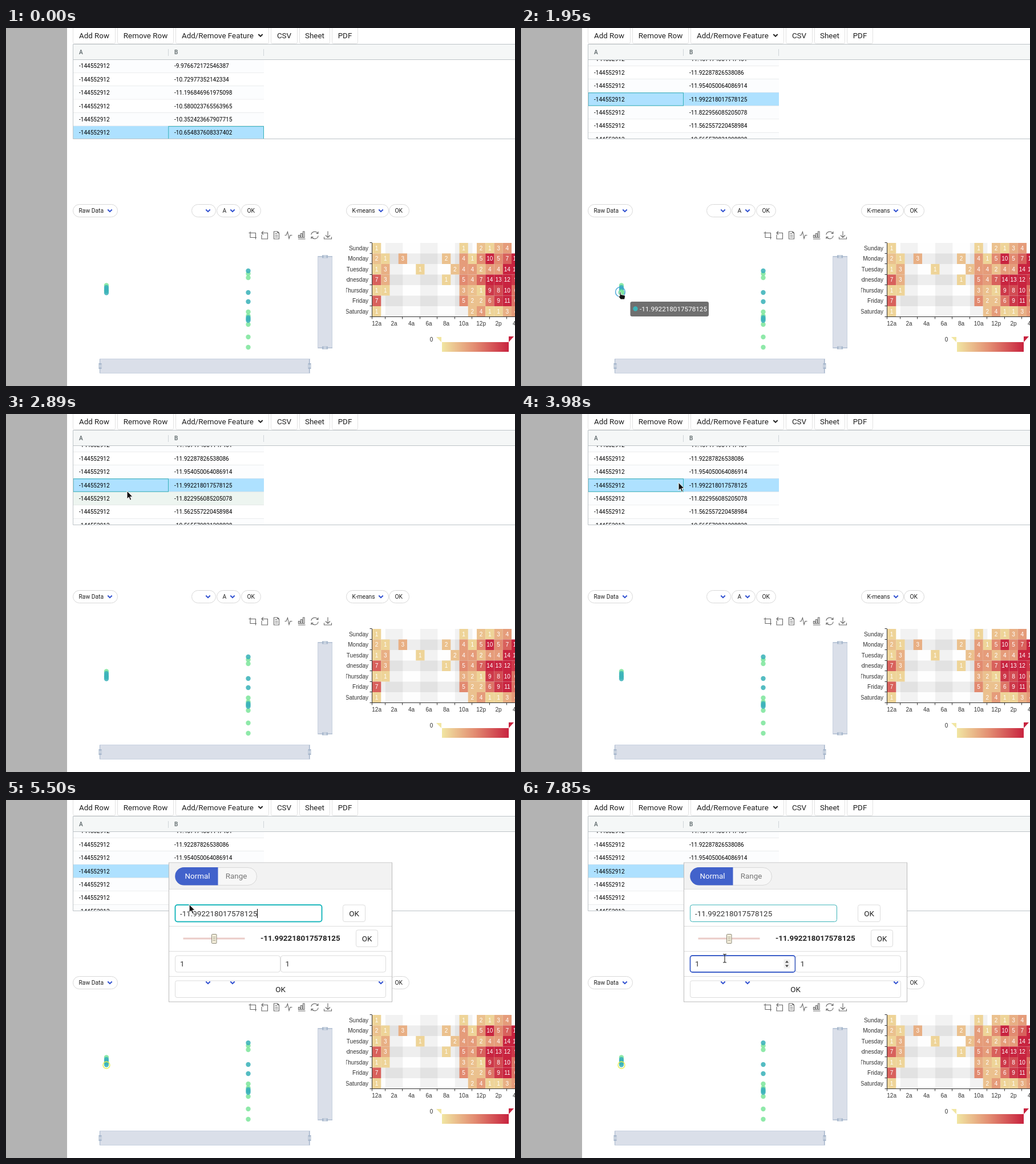
Animation of 892x628 px, one loop 8 s. Source, as an HTML page:

```html
<!DOCTYPE html>
<html lang="en">
<head>
<meta charset="utf-8">
<title>Data table and charts</title>
<style>
html, body { margin: 0; width: 100%; height: 100%; overflow: hidden; background: #fff; }
svg { display: block; width: 892px; height: 628px; font-family: Roboto, sans-serif; }
.chart { font-family: "Liberation Sans", Arial, sans-serif; }
</style>
</head>
<body>
<svg id="stage" viewBox="0 0 892 628"></svg>
<script>
const NS = 'http://www.w3.org/2000/svg';
const stage = document.getElementById('stage');
const LOOP = 8000;

function add(parent, tag, attrs = {}, content) {
  const node = document.createElementNS(NS, tag);
  set(node, attrs);
  if (content !== undefined) node.textContent = content;
  parent.appendChild(node);
  return node;
}
function set(node, attrs) {
  for (const key in attrs) node.setAttribute(key, attrs[key]);
}
const group = (parent, attrs) => add(parent, 'g', attrs);
const show = (node, on) => node.setAttribute('visibility', on ? 'visible' : 'hidden');
const rect = (parent, x, y, width, height, fill, more = {}) =>
  add(parent, 'rect', { x, y, width, height, fill, ...more });
const path = (parent, d, stroke, more = {}) =>
  add(parent, 'path', { d, stroke, fill: 'none', ...more });
const circle = (parent, cx, cy, r, more) => add(parent, 'circle', { cx, cy, r, ...more });

// Text placed by its vertical middle.
const label = (parent, x, mid, size, str, more = {}) =>
  add(parent, 'text', { x, y: mid + size * 0.355, 'font-size': size, fill: '#212121', ...more }, str);
const middle = { 'text-anchor': 'middle' };
const box = (parent, x1, y1, x2, y2, rx, stroke = '#dcdcdc', fill = '#fff') =>
  rect(parent, x1 + .5, y1 + .5, x2 - x1 - 1, y2 - y1 - 1, fill, { rx, stroke });
const chevron = (parent, x, y, stroke = '#2f4fd0') =>
  path(parent, `M${x - 3.7} ${y - 2}l3.7 3.7 3.7-3.7`, stroke, { 'stroke-width': 2 });

// ---- page and toolbar ----
rect(stage, 0, 0, 892, 628, '#fff');
rect(stage, 0, 0, 107, 628, '#b3b3b3');

[[117, 192, 'Add Row'], [195, 294, 'Remove Row'], [297, 461, 'Add/Remove Feature'],
 [464, 511, 'CSV'], [514, 568, 'Sheet'], [571, 617, 'PDF']].forEach(([x1, x2, name]) => {
  box(stage, x1, -4, x2, 28, 3, '#e2e2e2');
  if (name.includes('/')) {
    label(stage, 308, 13, 13.4, name);
    chevron(stage, 446, 13, '#212121');
  } else label(stage, (x1 + x2) / 2, 13, 13.4, name, middle);
});

// ---- table ----
const ROW = 23.4;
const TEAL = '#35b0b8';
const defs = add(stage, 'defs');
function clip(id, x, y, w, h) {
  rect(add(defs, 'clipPath', { id }), x, y, w, h, '#000');
  return `url(#${id})`;
}
const table = group(stage, { 'clip-path': clip('rows', 117, 56, 336, 138.5) });

function buildRows(top, values, selected, parent) {
  return values.map((value, i) => {
    const y = top + i * ROW;
    const base = i === selected ? '#aee1ff' : i % 2 ? '#fff' : '#fcfdfe';
    const back = rect(parent, 118, y, 334, ROW, base);
    path(parent, `M118 ${y + ROW}H452`, '#d9dcde');
    label(parent, 128, y + ROW / 2, 10.05, '-144552912', { fill: '#000' });
    label(parent, 295, y + ROW / 2, 10.05, value, { fill: '#000' });
    return { back, base, y };
  });
}
const before = group(table), after = group(table);
buildRows(55.1, ['-9.976672172546387', '-10.72977352142334', '-11.196846961975098',
  '-10.580023765563965', '-10.352423667907715', '-10.654837608337402'], 5, before);
rect(before, 284.8, 172.6, 166.7, 21.9, 'none', { stroke: TEAL });
const rows = buildRows(43.1, ['-11.457174301147461', '-11.92287826538086', '-11.954050064086914',
  '-11.992218017578125', '-11.822956085205078', '-11.562557220458984', '-10.565579831298828'], 3, after);
const focusCell = rect(after, 118, 113.8, 166.5, 22.4, 'none', { stroke: TEAL });

rect(stage, 117, 28.5, 776, 27, '#f5f7f7');
path(stage, 'M892 28.5H117.5V194.5H892M117 55.5H892', '#bdc3c7');
path(stage, 'M284.5 37V49M451.5 37V49', '#cfd4d8');
['A', 'B'].forEach((name, i) =>
  label(stage, 128 + 167 * i, 42.5, 10.05, name, { fill: '#6d7779', 'font-weight': 700 }));

// ---- select buttons ----
const selects = [[117, 196, 'Raw Data', 182], [325, 368, '', 354], [369, 411, 'A', 397],
  [412, 447, 'OK'], [596, 671, 'K-means', 657], [671, 707, 'OK']];
selects.forEach(([x1, x2, name, arrow]) => {
  box(stage, x1, 309, x2, 332, 11, '#d8d8d8');
  label(stage, x1 + 10.5, 320.5, 10.3, name);
  if (arrow) chevron(stage, arrow, 320.5);
});

// ---- chart tool icons ----
[[432, 'M-6.5-4H5.5V7M-4-6.5V4H3M3 4H7'],
 [453, 'M-5-4H5.5V6.5H-5V-1M-2-7-5-4-2-1'],
 [474, 'M-4.5-6.5H2L4.5-4V6.5H-4.5ZM2-6.5V-4H4.5M-2.5-3H1M-2.5 0H2.5M-2.5 3H2.5'],
 [495, 'M-6.5 0H-4L-1.5-6 1 6 3 0H6.5'],
 [518, 'M-6 6.5H6.5M-5.5 4V0H-3V4ZM-1.5 4V-3H1V4ZM2.5 4V-6.5H5V4Z'],
 [541, 'M-6.2-1A6.3 6.3 0 0 1 5.5-3M6.2 1A6.3 6.3 0 0 1-5.5 3M6-6.5V-3H2.5M-6 6.5V3H-2.5'],
 [564, 'M0-7V4M-4 0 0 4 4 0M-6.5 3V6.5H6.5V3']].forEach(([x, d]) =>
  path(stage, d, '#666', { transform: `translate(${x} 363.5)`, 'stroke-width': 1.1 }));

// ---- scatter ----
const GREEN = '#80e69d', DOT = '#3cb3b9';
const dots = (x, ys, fill) => ys.forEach(y => circle(stage, x, y, 4.2, { fill, 'fill-opacity': .88 }));
dots(176, [451.5, 461], GREEN);
dots(176, [455, 458, 461, 464.5], DOT);
dots(424.5, [431, 438, 498, 505, 520, 542, 560], GREEN);
dots(424.5, [426, 464, 480, 508, 510.5, 513], DOT);
const hoverDot = circle(stage, 176, 464, 5, { fill: GREEN, stroke: '#6dd6b0' });
const yellowRing = circle(stage, 176, 465, 6, { fill: 'none', stroke: '#e8ee4e', 'stroke-width': 1.3 });

function handle(x, y, turn) {
  const g = group(stage, { transform: `translate(${x} ${y}) rotate(${turn})` });
  rect(g, -2.5, -5, 5, 10, '#a7b7cc');
  path(g, 'M-1-2.5V2.5M1.2-2.5V2.5', '#fff', { 'stroke-width': .8 });
}
box(stage, 164, 580, 533, 606, 0, '#c9d2e0', '#dadfe9');
box(stage, 546, 400, 572, 562, 0, '#c9d2e0', '#dadfe9');
path(stage, 'M164.5 581V605M531.5 581V605M547 401H572M547 561H572', '#a7b7cc');
handle(165, 593, 0);
handle(532, 593, 0);
handle(559, 401, 90);
handle(559, 561, 90);

// ---- heat map ----
const heat = group(stage, { class: 'chart', 'clip-path': clip('heat', 596, 340, 296, 288) });
const X0 = 642, Y0 = 377, CW = 15.25, CH = 18.5;
const ramp = [[241, 230, 162], [226, 138, 112], [200, 35, 63]];
function heatColor(value) {
  const p = Math.min(value, 10) / 5, i = Math.min(Math.floor(p), 1);
  return `rgb(${ramp[i].map((c, k) => Math.round(c + (ramp[i + 1][k] - c) * (p - i)))})`;
}
const shade = i => i % 2 ? 'rgba(200,200,200,.3)' : 'rgba(250,250,250,.3)';
for (let i = 0; i < 9; i++) {
  const start = Math.max(X0, X0 + CW * (2 * i - .5));
  rect(heat, start, Y0, X0 + CW * (2 * i + 1.5) - start, CH * 7, shade(i));
}
const week = { Sunday: '1.........1.2134.', Monday: '21.3....2.415a57b', Tuesday: '13...1...244244ec',
  Wednesday: '73......1.547edc9', Thursday: '11........32198a6', Friday: '7.........52269b6',
  Saturday: '1..........241134' };
Object.entries(week).forEach(([day, counts], r) => {
  const y = Y0 + r * CH, mid = y + CH / 2;
  rect(heat, X0, y, 260, CH, shade(r));
  label(heat, 635, mid, 10.05, day, { 'text-anchor': 'end', fill: '#333' });
  [...counts].forEach((c, h) => {
    if (c === '.') return;
    const value = parseInt(c, 16), x = X0 + h * CW;
    rect(heat, x, y, CW, CH, heatColor(value));
    label(heat, x + CW / 2, mid, 10.05, value, { ...middle, fill: '#fff' });
  });
});
let axis = 'M641.5 377V507M641.5 506.5H892';
for (let r = 0; r < 8; r++) axis += `M637.5 ${Math.round(Y0 + r * CH) - .5}h4`;
for (let i = 0; i < 9; i++) {
  const x = Math.max(641.5, Math.round(X0 + CW * (2 * i - .5)) - .5);
  axis += `M${x} 506.5v4`;
  const hour = (2 * i) % 12 || 12;
  label(heat, X0 + CW * (2 * i + .5), 518.5, 10.05, hour + (i < 6 ? 'a' : 'p'), { ...middle, fill: '#333' });
}
path(heat, axis, '#333');

const gradient = add(defs, 'linearGradient', { id: 'scale' });
[0, 5, 10].forEach(v => add(gradient, 'stop', { offset: v / 10, 'stop-color': heatColor(v) }));
rect(heat, 764, 551, 117, 17, 'url(#scale)');
path(heat, 'M754 542H763V551Z', 'none', { fill: heatColor(0) });
path(heat, 'M881 541H890L881 551Z', 'none', { fill: heatColor(10) });
label(heat, 745.5, 546, 10.05, '0', { ...middle, fill: '#333' });

// ---- chart tooltip ----
const VALUE = '-11.992218017578125';
const tooltip = group(stage);
rect(tooltip, 0, 0, 137.5, 26, 'rgba(50,50,50,.7)', { rx: 3.3 });
circle(tooltip, 9, 12.5, 4.2, { fill: DOT });
label(tooltip, 16.5, 12.7, 11.7, VALUE, { fill: '#fff' });

// ---- cell editor ----
const editor = group(stage);
box(editor, 285, 109.5, 677, 354.5, 0, '#bababa');
rect(editor, 286, 110.5, 390, 46, '#f2f2f2');
path(editor, 'M286 156.5H676M286 221.5H676M286 265.5H676M286 309.5H676', '#dedede');
box(editor, 296, 118, 440, 150, 15.5, '#d8d8d8', '#f7f7f7');
path(editor, 'M371.5 118V149.5H312A15.75 15.75 0 0 1 312 118Z', 'none', { fill: '#4262cb' });
label(editor, 335.5, 133.5, 13.4, 'Normal', { ...middle, fill: '#fff' });
label(editor, 403.5, 133.5, 13.4, 'Range', { ...middle, fill: '#757575' });

const valueField = box(editor, 296, 183.5, 554, 214, 4);
label(editor, 305, 199, 13.4, VALUE, { fill: '#333' });
const valueCaret = path(editor, 'M440.5 191V207', '#000');
const okButton = (x1, y1, x2, y2) => {
  box(editor, x1, y1, x2, y2, 3.5);
  label(editor, (x1 + x2) / 2, (y1 + y2) / 2, 13.4, 'OK', middle);
};
okButton(590, 183.5, 630, 214);
path(editor, 'M310.5 243H418.5', '#eacbc7', { 'stroke-width': 3 });
box(editor, 360, 235, 369.5, 252, 1, '#8b8878', '#f4eedb');
path(editor, 'M362.5 240.5H367M362.5 243.5H367M362.5 246.5H367', '#a19d8b');
label(editor, 446, 242.5, 13.4, VALUE, { 'font-weight': 700 });
okButton(613, 227.5, 652, 258);
const leftField = box(editor, 296, 272.5, 481, 302.5, 4);
box(editor, 481, 272.5, 666, 302.5, 4);
label(editor, 305, 287.5, 13.4, '1', { fill: '#333' });
label(editor, 489.5, 287.5, 13.4, '1', { fill: '#333' });
const leftCaret = path(editor, 'M312.5 280V296', '#000');
const spinner = group(editor);
rect(spinner, 460.5, 279.5, 11, 16, '#efefef');
path(spinner, 'M463 285.5 466 281.8 469 285.5ZM463 289.5 466 293.2 469 289.5Z', 'none', { fill: '#444' });
okButton(296, 316.5, 666, 347);
[354, 397, 657].forEach(x => chevron(editor, x, 320.5));

// ---- pointer ----
const ripple = circle(stage, 0, 0, 5, { fill: 'none', stroke: '#3a9fd6', 'stroke-width': 1.5 });
const pointer = group(stage);
const shapes = {
  arrow: path(pointer, 'M0 0V14L3.3 11 5.5 16.3 7.9 15.3 5.7 10.2H10Z', '#fff', { fill: '#111' }),
  hand: path(pointer, 'M-1 .5Q0-.7 1 .5V4.5L7.5 6Q8.7 6.5 8.5 8L7.5 13H.5L-3 8Q-3 6.3-1 7.5Z',
    '#fff', { fill: '#111', 'stroke-width': .8 }),
  beam: path(pointer, 'M-3-7.5H-1L0-6.5 1-7.5H3M0-6.5V6M-3 7H-1L0 6 1 7H3', '#222', { 'stroke-width': 1.1 })
};

// ---- motion ----
const route = [[950, 178, 461], [1200, 174, 463], [2350, 174, 463], [2870, 212, 135], [2930, 212, 135],
  [3120, 212, 125], [3160, 212, 124], [3580, 212, 124], [4170, 296.5, 119], [5160, 296.5, 119],
  [5940, 357, 277], [6040, 357, 278]];
const clicks = [[1690, 174, 463], [4320, 297, 121], [4400, 297, 121], [6390, 357, 278]];
const clamp = v => Math.max(0, Math.min(1, v));
const smooth = v => v * v * (3 - 2 * v);

function pointerAt(t) {
  const next = route.findIndex(p => p[0] > t);
  if (next < 0) return route[route.length - 1].slice(1);
  if (next === 0) return route[0].slice(1);
  const [t0, x0, y0] = route[next - 1], [t1, x1, y1] = route[next];
  const k = smooth((t - t0) / (t1 - t0));
  return [x0 + (x1 - x0) * k, y0 + (y1 - y0) * k];
}

function draw(t) {
  const [x, y] = pointerAt(t);
  const scrolled = t >= 1810, editing = t >= 4480, moved = t >= 6430;

  show(before, !scrolled);
  show(after, scrolled);
  rows.forEach((row, i) => {
    const hovered = scrolled && !editing && i !== 3 && y + 2 > row.y && y + 2 <= row.y + ROW && y < 194;
    row.back.setAttribute('fill', hovered ? '#edf5f0' : row.base);
  });
  show(focusCell, scrolled && !editing);
  focusCell.setAttribute('x', t < 4360 ? 118 : 284.8);

  const slide = 1 - (1 - clamp((t - 950) / 400)) ** 3;
  set(tooltip, {
    transform: `translate(${237.5 - 46 * slide} ${484 - 4 * slide})`,
    opacity: clamp((t - 950) / 200) * (1 - clamp((t - 2450) / 200))
  });
  show(hoverDot, t >= 990 && t < 2400);
  show(yellowRing, t >= 5400);

  show(editor, editing);
  set(valueField, { stroke: moved ? '#3bb3b8' : '#1fb8bd', 'stroke-width': moved ? 1 : 2 });
  set(leftField, {
    stroke: moved ? '#3d5fc9' : t >= 5850 ? '#a9a9a9' : '#dcdcdc',
    'stroke-width': moved ? 1.8 : 1
  });
  show(valueCaret, editing && !moved);
  show(leftCaret, moved && t < 7440);
  show(spinner, t >= 5850);

  const inField = editing && (y > 184 && y < 213 || y > 273);
  const kind = t < 2400 ? 'hand' : inField ? 'beam' : 'arrow';
  for (const name in shapes) show(shapes[name], t >= 950 && name === kind);
  pointer.setAttribute('transform', `translate(${x} ${y})`);

  const click = clicks.filter(c => t >= c[0] && t < c[0] + 470).pop();
  show(ripple, !!click);
  if (click) {
    const k = (t - click[0]) / 470;
    set(ripple, { cx: click[1], cy: click[2], r: 2 + 8 * (1 - (1 - k) ** 2), opacity: 1 - k ** 4 });
  }
}

const start = performance.now();
function tick() {
  draw((performance.now() - start) % LOOP);
  requestAnimationFrame(tick);
}
tick();
</script>
</body>
</html>
```
